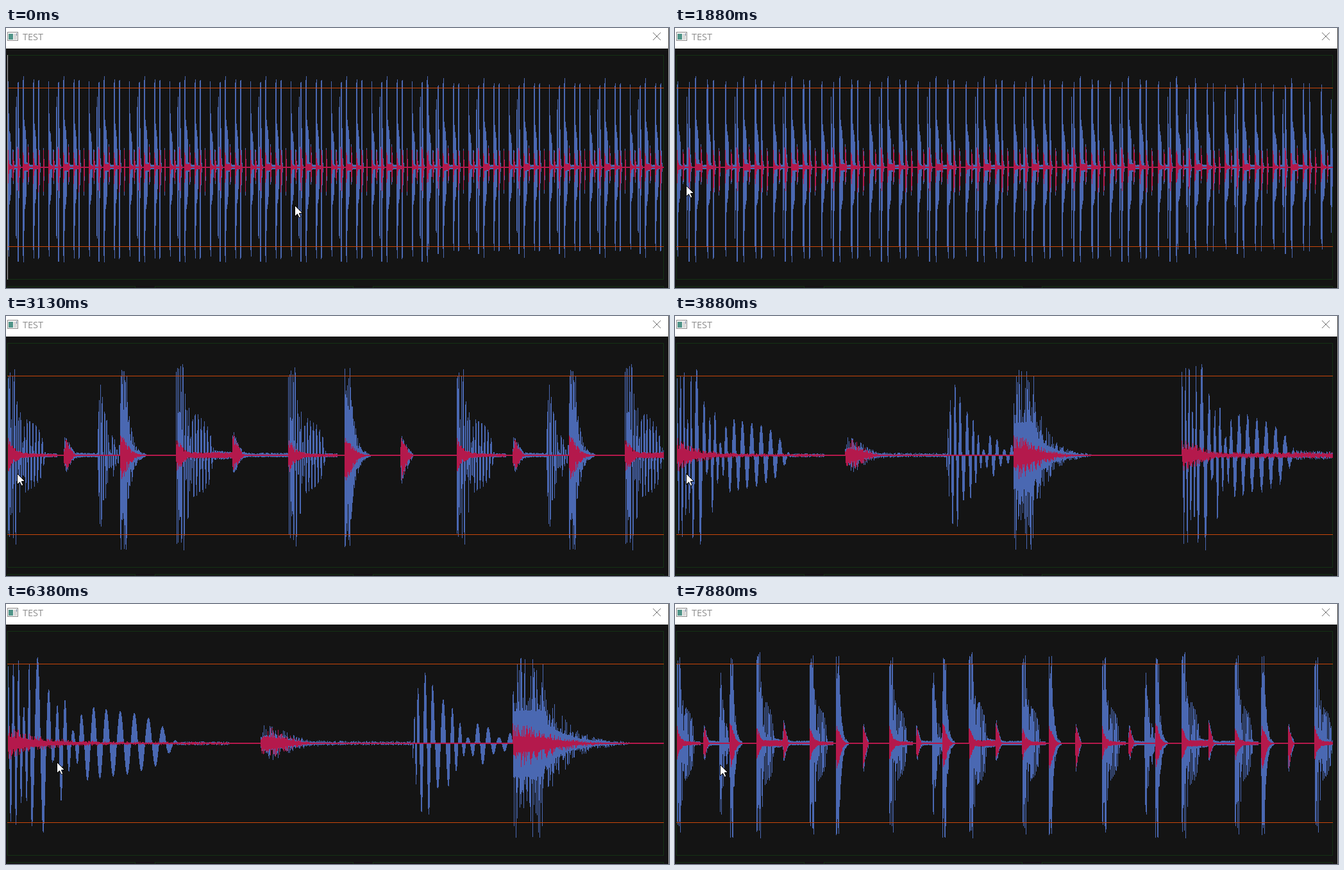
These frames come from a looping animation (1034x405 px, 8000 ms). An HTML page with a canvas:

```html
<!DOCTYPE html>
<html lang="en">
<head>
<meta charset="utf-8">
<title>TEST</title>
<style>
  html, body { margin: 0; width: 100%; height: 100%; overflow: hidden; background: #141414; }
  canvas { display: block; }
</style>
</head>
<body>
<canvas id="stage" width="1034" height="405"></canvas>
<script>
const ctx = document.getElementById('stage').getContext('2d');
const LOOP = 8000;
const PERIOD = 6300;       // samples in one bar of the beat
const STEP = PERIOD / 8;
const RESTART = 65500;     // sample where the beat starts over, slightly softer
const MID = 217, LEFT = 3, COLUMNS = 1023;
const BLUE = '#4a68b2', RED = '#b4194c', ORANGE = '#c8460a', GREEN = '#143214';

let seed = 7;
function random() {
  seed = (seed * 1664525 + 1013904223) % 4294967296;
  return seed / 4294967296;
}

// Straight lines through key points [x, y].
function along(points, x) {
  const k = Math.max(1, points.findIndex(p => p[0] >= x));
  const [x0, y0] = points[k - 1], [x1, y1] = points[k];
  return y0 + (y1 - y0) * (x - x0) / (x1 - x0);
}

// Drum bodies: time -> half swings done, and half swings -> loudness.
const KICK = {
  sign: 1, length: 263,
  swings: [[0, 0], [37, 9], [64, 12], [114, 20], [153, 24], [263, 34]],
  level: [[0, 120], [4, 130], [6, 55], [8, 124], [11, 139], [13, 25], [15, 91],
    [18, 19], [21, 58], [28, 47], [31, 36], [34, 2]]
};
const TOM = {
  sign: -1, length: 156,
  swings: [[0, 0], [8, 3], [31, 7], [56, 10], [86, 15], [101, 17], [156, 23.5]],
  level: [[0, 20], [4, 108], [6, 112], [8, 70], [10, 67], [15, 8], [17.5, 37], [21, 9], [23.5, 18]]
};

const blue = new Float32Array(PERIOD);
const red = new Float32Array(PERIOD);

// Adds fn(time, sample) to a track; one unit of time is two samples.
function add(track, step, length, fn) {
  const start = Math.round(step * STEP);
  for (let i = 0; i < length * 2 && start + i < PERIOD; i++) track[start + i] += fn(i / 2, i);
}
function tone(step, drum, gain = 1) {
  add(blue, step, drum.length, t => {
    const n = along(drum.swings, t);
    return gain * drum.sign * along(drum.level, n) * Math.cos(Math.PI * n);
  });
}
// Alternating spikes with a solid core.
function noise(track, step, length, level, down = 1) {
  add(track, step, length, (t, i) => {
    const v = level(t) * (0.35 + 0.65 * random() ** 2);
    return i % 2 ? -v * down : v;
  });
}
const bell = (t, width) => Math.exp(-((t / width) ** 2));

function kick(step, gain) {
  tone(step, KICK, gain);
  noise(blue, step + 0.61, 105, () => 3.5);
  noise(red, step, 343, t => gain * 27 * Math.exp(-t / 45) + 2.5);
}
function longKick(step) {
  tone(step, KICK, 1.02);
  noise(blue, step, 394, t => 20 * Math.exp(-t / 300));
  noise(red, step, 394, t => 20 * bell(t, 50) + 5);
}
function hat(step, level, down, tail) {
  const ring = t => level * Math.min(1, (t + 2) / 6) * bell(t, 50);
  noise(red, step, 90, ring, down);
  noise(blue, step, tail, t => ring(t) + 4, down);
}
function snare(step, level) {
  noise(blue, step, 183, t => t < 48 ? level : 0.7 * level * Math.exp((48 - t) / 36), 1.04);
  noise(red, step, 183, t => 30 * bell(t, 72) + 1, 1.3);
}

kick(0, 1);
hat(1, 28, 0.95, 240);
tone(1.602, TOM);
snare(2, 142);
longKick(3);
hat(4, 33, 0.8, 394);
kick(5, 1.02);
snare(6, 138);
hat(7, 28, 1.45, 84);

// [time, samples per column]
const ZOOMS = [[0, 100], [1880, 84], [2130, 48], [2380, 28], [2880, 16], [3130, 9], [3630, 5],
  [3880, 3], [4630, 1], [6380, 2], [6880, 3], [7380, 6], [7630, 11], [7880, 19]];
// [time, x, y]; without a place the cursor is hidden
const CURSORS = [[0, 450, 276], [270], [800, 57, 239], [1080, 46, 240], [1360, 19, 245],
  [1880, 17, 245], [5130], [6380, 79, 246], [7130, 74, 248], [7380, 70, 250]];

function rect(color, x, y, w, h) {
  ctx.fillStyle = color;
  ctx.fillRect(x, y, w, h);
}
function box(color, x, y, w, h) {
  ctx.strokeStyle = color;
  ctx.lineWidth = 1;
  ctx.strokeRect(x + 0.5, y + 0.5, w - 1, h - 1);
}

function drawTrack(track, color, zoom, least) {
  for (let x = 0; x < COLUMNS; x++) {
    let hi = 0, lo = 0;
    for (let i = x * zoom; i < (x + 1) * zoom; i++) {
      const late = i >= RESTART;
      const v = track[(late ? i - RESTART : i) % PERIOD];
      hi = Math.max(hi, late ? v * 0.96 : v);
      lo = Math.min(lo, late ? v * 0.92 : v);
    }
    const top = MID - Math.max(least, Math.round(Math.min(hi, 142)));
    const bottom = MID + Math.max(least, Math.round(Math.min(-lo, 148)));
    if (bottom > top) rect(color, LEFT + x, top, 1, bottom - top);
  }
}

function drawTitle() {
  rect('#ffffff', 0, 0, 1033, 32);
  rect('#3c3c3c', 1033, 0, 1, 32);
  rect('#f4f4f4', 2, 6, 17, 14);
  box('#8c8c8c', 2, 6, 17, 14);
  rect('#4f9488', 4, 9, 7, 9);
  rect('#d8d8d8', 12, 9, 5, 9);
  rect('#7084a4', 16, 8, 1, 4);
  ctx.fillStyle = '#8c8c8c';
  ctx.font = '14.5px "Open Sans", "Noto Sans", sans-serif';
  ctx.fillText('TEST', 26, 19);
  ctx.strokeStyle = '#707070';
  ctx.beginPath();
  ctx.moveTo(1009, 7);
  ctx.lineTo(1021, 19);
  ctx.moveTo(1021, 7);
  ctx.lineTo(1009, 19);
  ctx.stroke();
}

function drawCursor(x, y) {
  const points = [[0, 0], [0, 17], [4, 13.3], [6.8, 19], [9.4, 18], [6.8, 12.2], [12, 12]];
  ctx.beginPath();
  for (const [dx, dy] of points) ctx.lineTo(x + 0.5 + dx, y + 0.5 + dy);
  ctx.closePath();
  ctx.fillStyle = '#ffffff';
  ctx.fill();
  ctx.strokeStyle = '#000000';
  ctx.lineWidth = 1;
  ctx.stroke();
}

function draw(zoom, cursor) {
  rect('#141414', 0, 0, 1034, 405);
  drawTitle();
  rect('#a0a0a0', 1033, 32, 1, 373);
  box(GREEN, 2, 42, 1024, 350);
  for (const [left, right] of [[2, 202], [232, 542], [572, 1026]]) {
    box(GREEN, left, 402, right - left, 20);
  }
  drawTrack(blue, BLUE, zoom, 0);
  drawTrack(red, RED, zoom, 1);
  rect(ORANGE, 2, 93, 1024, 1);
  rect(ORANGE, 2, 340, 1024, 1);
  if (zoom === ZOOMS[0][1]) rect('#b4b4b4', 2, 42, 1, 350);
  if (cursor.length > 1) drawCursor(cursor[1], cursor[2]);
}

const latest = (list, t) => list.findLast(entry => entry[0] <= t);
let shownZoom, shownCursor;
function tick() {
  const t = performance.now() % LOOP;
  const zoom = latest(ZOOMS, t)[1], cursor = latest(CURSORS, t);
  if (zoom !== shownZoom || cursor !== shownCursor) {
    draw(zoom, cursor);
    shownZoom = zoom;
    shownCursor = cursor;
  }
  requestAnimationFrame(tick);
}
tick();
</script>
</body>
</html>
```
